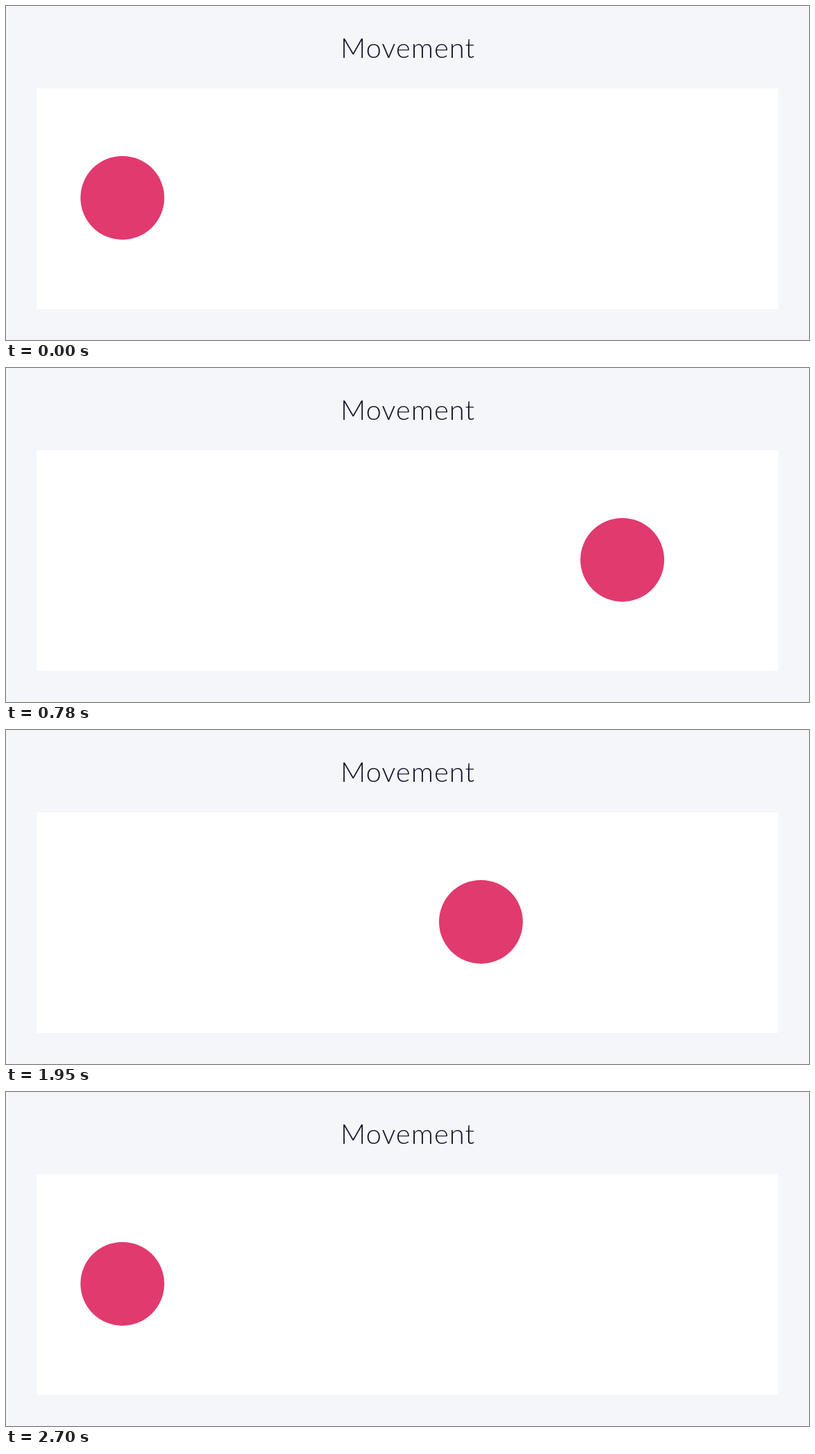
Animation, 1159 px wide and 483 px high, one loop 3.3 s. Source, as an HTML page:

```html
<!DOCTYPE html>
<html lang="en">
<head>
<meta charset="utf-8">
<title>Movement</title>
<style>
  html, body { margin: 0; width: 100%; height: 100%; overflow: hidden; background: #f4f6fa; }
  svg { display: block; width: 1159px; height: 483px; }
  text { font: 300 40px Lato, Inter, sans-serif; letter-spacing: 1px; fill: #14172c; text-anchor: middle; }
</style>
</head>
<body>
<svg viewBox="0 0 1159 483">
  <rect width="1159" height="483" fill="#f4f6fa"/>
  <text x="580" y="75">Movement</text>
  <rect x="44.3" y="119" width="1070.4" height="319" fill="#fff"/>
  <circle id="ball" cx="168" cy="277.4" r="60.5" fill="#e13a6e"/>
</svg>
<script>
  const LOOP = 3300, STEP = 30, MOVE = 1050, BACK = 1650;
  const LEFT = 168, RIGHT = 987.4;
  const ball = document.getElementById('ball');

  // One coordinate of a cubic Bezier from 0 to 1 with inner controls a and b.
  const bezier = (a, b, s) =>
    3 * a * s * (1 - s) ** 2 + 3 * b * s * s * (1 - s) + s ** 3;

  // Linear departure, soft arrival: cubic-bezier(1/6, 1/6, 2/3, 1).
  function ease(u) {
    if (u <= 0) return 0;
    if (u >= 1) return 1;
    let lo = 0, hi = 1;
    for (let i = 0; i < 30; i++) {
      const mid = (lo + hi) / 2;
      if (bezier(1 / 6, 2 / 3, mid) < u) lo = mid; else hi = mid;
    }
    return bezier(1 / 6, 1, lo);
  }

  function draw(ms) {
    const t = Math.floor((ms % LOOP) / STEP) * STEP;
    const p = ease(t / MOVE) - ease((t - BACK) / MOVE);
    ball.setAttribute('cx', LEFT + (RIGHT - LEFT) * p);
  }

  const start = performance.now();
  function tick() {
    draw(performance.now() - start);
    requestAnimationFrame(tick);
  }
  tick();
</script>
</body>
</html>
```
